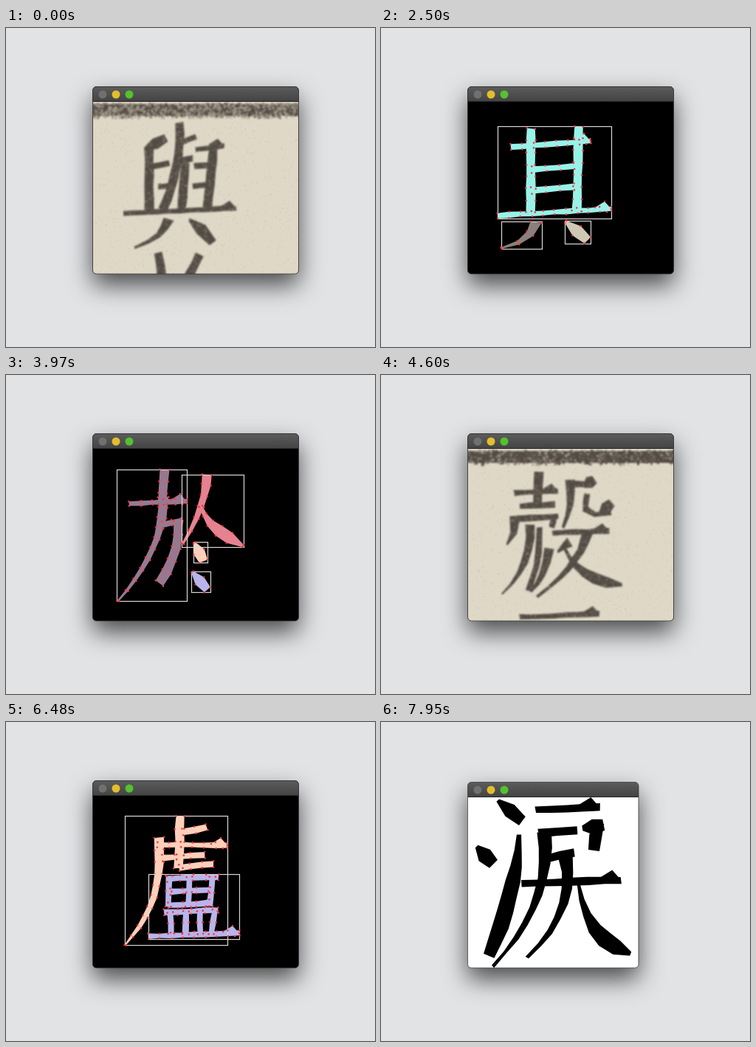
Animation, 500 px wide and 432 px high, one loop 8000 ms. Source, as an HTML page with a canvas:

```html
<!DOCTYPE html>
<html lang="zh">
<head>
<meta charset="utf-8">
<title>Character segmentation</title>
<style>
html, body { margin: 0; width: 500px; height: 432px; overflow: hidden; background: #e1e3e5 }
canvas { display: block }
</style>
</head>
<body>
<canvas id="stage" width="500" height="432"></canvas>
<script>
const stage = document.getElementById('stage'), ctx = stage.getContext('2d');
const LOOP = 8000;
// Each glyph shows four views: scan, threshold, components, crop.
const TIMES = [0, 840, 1040, 1460, 1880, 2080, 2500, 2920, 3340, 3550, 3970, 4180,
  4600, 4810, 5230, 5430, 5850, 6270, 6480, 6900, 7110, 7320, 7740, 7950];
const PALETTE = ['#fff08c', '#93dfb2', '#98f2e8', '#8b7f7b', '#cec8b4', '#99788f', '#e6828f', '#ffcfba', '#b9b4ea'];

// Brush width along a stroke, u from 0 to 1:
// h bar with a knob, t bar, s stem, p left sweep, n right sweep, d dot.
const WIDTH = {
  h: () => 7,
  t: () => 8,
  s: () => 12,
  p: u => 14 - 11 * u,
  n: u => 4 + 13 * Math.sin(Math.PI * u * u),
  d: u => 4 + 13 * Math.sin(Math.PI * .8 * u)
};

// A stroke is its kind and the two or three points its middle line passes through.
// Every entry of parts is one connected component; next is the top of the character below.
const glyphs = [
  { wear: .6, hue: 7, next: 's 206 304 211 336, s 263 306 248 336',
    parts: ['s 194 163 194 249, d 188 164 217 149, t 198 187 222 183, t 206 215 221 214, h 159 251 312 244,' +
      's 235 128 231 188 212 246, t 236 155 258 147, t 233 181 253 177, s 243 182 238 246,' +
      'h 257 165 296 160, s 281 162 273 246, t 255 187 276 186, t 253 214 272 213',
      'p 220 259 206 281 174 298', 'd 248 260 264 272 280 291'] },
  { wear: .4, hue: 2, next: 'h 205 324 272 321',
    parts: ['h 176 161 284 153, s 203 136 203 250, s 268 133 265 248, t 204 192 262 187, t 204 220 262 215, h 158 254 312 245',
      'p 210 263 195 285 163 298', 'd 250 262 280 288'] },
  { wear: .2, hue: 5, next: 's 231 313 236 336, s 242 317 241 336',
    parts: ['s 215 128 212 175, p 213 165 199 235 152 306, h 167 174 245 171, t 212 203 238 197, s 234 198 228 242 208 282',
      'p 272 135 264 178 240 228, n 264 178 282 206 321 231', 'd 255 227 268 252', 'd 252 267 273 291'] },
  { wear: .15, hue: 0, next: 'h 188 328 296 323',
    parts: ['h 180 160 240 157, s 214 131 212 175, t 188 178 236 175',
      'p 182 191 180 214 170 230, t 184 195 240 191, t 235 190 231 207',
      'p 256 142 256 175 246 207, t 256 147 276 148, d 274 151 290 141',
      't 279 160 277 184, t 276 181 290 189 312 186, d 296 187 313 173',
      'p 202 203 194 254 164 297',
      't 215 206 212 250 200 292, p 228 235 218 270 203 294',
      'h 232 214 309 211, p 280 213 258 257 211 300, n 249 234 276 268 327 284, p 256 226 249 231 239 240'] },
  { wear: .3, hue: 7, next: 's 212 320 240 332',
    parts: ['p 207 156 200 236 161 302, h 205 166 300 167, s 236 127 234 198, t 240 149 272 143, t 212 184 270 180, t 234 198 281 192',
      't 221 208 220 250, t 219 212 288 210, t 280 210 276 250, t 222 230 276 227, t 220 248 276 245, t 248 210 247 250,' +
      't 214 258 288 255, t 223 258 223 287, t 244 256 243 287, t 263 256 263 287, t 283 255 278 287, h 193 290 316 286'] },
  { wear: .3, hue: 1, next: 'd 222 318 254 330',
    parts: ['d 179 128 204 149', 'd 157 175 175 194', 'h 218 138 284 135', 'd 266 157 288 153, s 282 152 278 180',
      'd 201 164 191 227 170 288, t 221 162 261 159, p 227 160 218 232 174 299, t 230 188 258 182, t 252 182 248 212,' +
      'h 204 214 306 210, p 249 186 244 242 209 290, n 262 212 279 260 316 286'] }
];

let seed = 5;
const rand = () => (seed = (seed * 16807) % 2147483647) / 2147483647;
const jitter = () => (rand() - .5) * 1.6;

// Outline of one stroke: a quadratic middle line widened on both sides.
function brush(text) {
  const [kind, ...words] = text.trim().split(' ');
  const n = words.map(Number), [x0, y0] = n, [x2, y2] = n.slice(-2);
  const bend = n.length > 4;
  const cx = bend ? 2 * n[2] - (x0 + x2) / 2 : (x0 + x2) / 2;
  const cy = bend ? 2 * n[3] - (y0 + y2) / 2 : (y0 + y2) / 2;
  const left = [], right = [], steps = Math.max(2, Math.hypot(x2 - x0, y2 - y0) / 15 | 0);
  for (let i = 0; i <= steps; i++) {
    const u = i / steps, v = 1 - u;
    const x = v * v * x0 + 2 * u * v * cx + u * u * x2, y = v * v * y0 + 2 * u * v * cy + u * u * y2;
    const dx = v * (cx - x0) + u * (x2 - cx), dy = v * (cy - y0) + u * (y2 - cy);
    const half = WIDTH[kind](u) / 2 / Math.hypot(dx, dy);
    left.push([x - dy * half + jitter(), y + dx * half + jitter()]);
    right.unshift([x + dy * half + jitter(), y - dx * half + jitter()]);
  }
  const shapes = [[...left, ...right]];
  if (kind === 'h') shapes.push([[x2 - 22, y2 - 2], [x2 - 9, y2 - 10], [x2, y2], [x2 - 6, y2 + 4]]);
  return shapes;
}

const parse = text => text.split(',').flatMap(brush);

function bounds(shapes) {
  const xs = shapes.flat().map(p => p[0]), ys = shapes.flat().map(p => p[1]);
  return [Math.min(...xs), Math.min(...ys), Math.max(...xs), Math.max(...ys)];
}

for (const g of glyphs) {
  g.parts = g.parts.map(parse);
  g.ink = g.parts.flat();
  g.page = g.ink.concat(parse(g.next));
}

function fill(c, shapes, color) {
  c.fillStyle = color;
  for (const points of shapes) {
    c.beginPath();
    points.forEach(p => c.lineTo(...p));
    c.fill();
  }
}

function disc(x, y, r, color) {
  ctx.fillStyle = color;
  ctx.beginPath();
  ctx.arc(x, y, r, 0, 7);
  ctx.fill();
}

function speckle(c, count, [x, y, w, h], size, color) {
  c.fillStyle = color;
  for (let i = 0; i < count; i++)
    c.fillRect(x + rand() * w, y + rand() * h, size * (.5 + rand()), size * (.5 + rand()));
}

function band(c, g, dark, light) {
  c.fillStyle = dark;
  c.fillRect(117, 103, 281, 16);
  speckle(c, 350, [117, 101, 281, 19], 2.5, dark);
  speckle(c, 1100 * g.wear, [117, 100, 281, 21], 2.2, light);
}

function drawScan(g) {
  ctx.fillStyle = '#dfd8c7';
  ctx.fillRect(117, 99, 281, 235);
  speckle(ctx, 1200, [117, 99, 281, 235], 1.5, 'rgba(150,130,95,.1)');
  const layer = document.createElement('canvas');
  layer.width = 500;
  layer.height = 432;
  const c = layer.getContext('2d'), dark = '#524b44';
  fill(c, g.page, dark);
  band(c, g, dark, '#a79e8f');
  c.globalCompositeOperation = 'source-atop';
  speckle(c, 4500, [117, 100, 281, 234], 1.8, 'rgba(150,139,124,.45)');
  ctx.filter = 'blur(1px)';
  ctx.drawImage(layer, 0, 0);
  ctx.filter = 'none';
}

function drawThreshold(g) {
  band(ctx, g, '#fff', '#000');
  fill(ctx, g.page, '#fff');
}

function drawComponents(g) {
  g.parts.forEach((shapes, i) => fill(ctx, shapes, PALETTE[(g.hue + i) % PALETTE.length]));
  ctx.strokeStyle = '#dcd8d6';
  ctx.lineWidth = 1.2;
  for (const shapes of g.parts) {
    const [x0, y0, x1, y1] = bounds(shapes).map(Math.round);
    ctx.strokeRect(x0 + .5, y0 + .5, x1 - x0, y1 - y0);
    for (const [x, y] of shapes.flat()) disc(x, y, 1.3, '#f5353d');
  }
}

function drawCrop(g) {
  const [x0, y0, x1, y1] = bounds(g.ink), s = 231 / Math.max(x1 - x0, y1 - y0);
  ctx.save();
  ctx.translate(233.5, 217.5);
  ctx.scale(s, s);
  ctx.translate(-(x0 + x1) / 2, -(y0 + y1) / 2);
  fill(ctx, g.ink, '#000');
  ctx.restore();
}

function drawWindow(top, right, back, content) {
  const frame = new Path2D();
  frame.roundRect(117.5, top - .5, right - 118, 333.5 - top, 5);
  ctx.fillStyle = '#e1e3e5';
  ctx.fillRect(0, 0, 500, 432);
  ctx.save();
  ctx.shadowColor = 'rgba(0,0,0,.68)';
  ctx.shadowBlur = 33;
  ctx.shadowOffsetY = 15;
  ctx.fillStyle = back;
  ctx.fill(frame);
  ctx.restore();

  ctx.save();
  ctx.clip(frame);
  ctx.fillStyle = back;
  ctx.fillRect(117, top - 1, 281, 256);
  content();
  const bar = ctx.createLinearGradient(0, top, 0, top + 20);
  bar.addColorStop(0, '#5b5b5b');
  bar.addColorStop(1, '#434343');
  ctx.fillStyle = bar;
  ctx.fillRect(117, top - 1, 281, 20);
  ctx.fillStyle = '#262626';
  ctx.fillRect(117, top + 19, 281, 1);
  ['#707070', '#e5bd2e', '#53c22d'].forEach((color, i) => disc(131 + 18 * i, top + 10, 5.5, color));
  ctx.restore();
  ctx.strokeStyle = 'rgba(50,50,50,.75)';
  ctx.lineWidth = 1;
  ctx.stroke(frame);
}

const views = [drawScan, drawThreshold, drawComponents, drawCrop];
let shown = -1;

function tick() {
  const t = performance.now() % LOOP;
  const step = TIMES.findLastIndex(start => start <= t);
  if (step !== shown) {
    shown = step;
    const view = step % 4, index = step >> 2, crop = view === 3;
    seed = 71 + index * 977;
    drawWindow(crop ? 82 : 80, crop ? 349.5 : 397, crop ? '#fff' : '#000',
      () => views[view](glyphs[index]));
  }
  requestAnimationFrame(tick);
}
tick();
</script>
</body>
</html>
```
